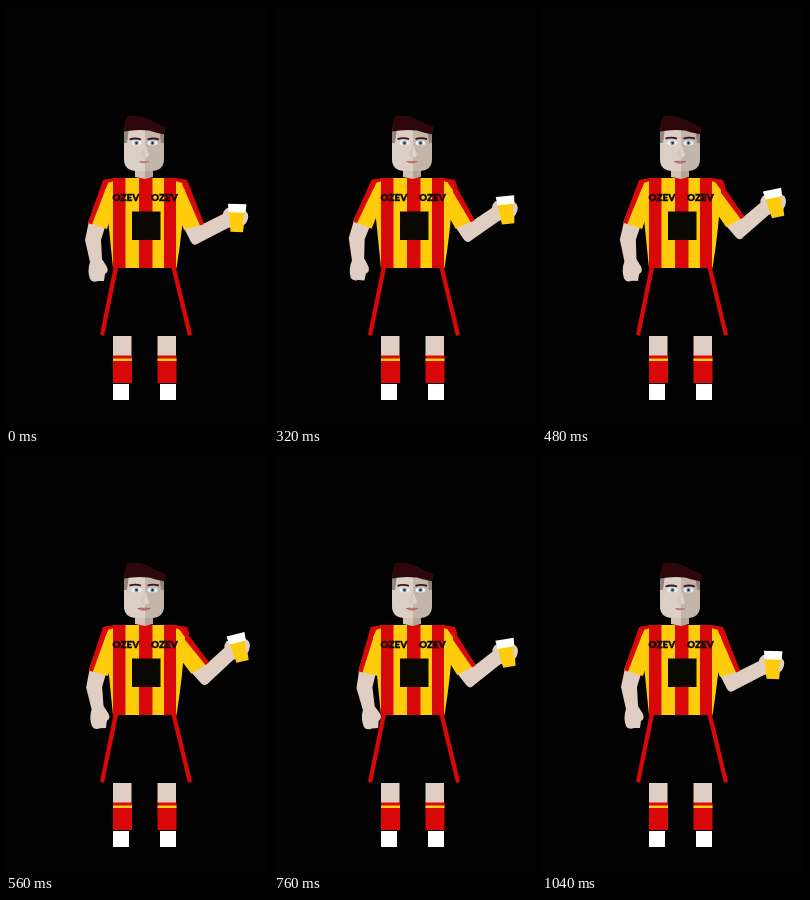
These frames come from a looping animation (262x419 px, 2.04 s). An HTML page:

```html
<!DOCTYPE html>
<html lang="nl">
<head>
<meta charset="utf-8">
<title>Supporter</title>
<style>
  html, body { margin: 0; width: 100%; height: 100%; overflow: hidden; background: #020202; }
  svg { display: block; width: 100vw; height: 100vh; }
  text { font: 900 10px Lato, "Open Sans", sans-serif; text-anchor: middle; fill: #080604; stroke: #080604; stroke-width: .3; }
  .red { fill: #d90808; }
  .yellow { fill: #ffcc0c; }
  .skin { fill: #dfcec1; }
  .hair { fill: #2e070b; }
  .brow { fill: none; stroke: #3d1416; stroke-width: 1.8; }
</style>
</head>
<body>
<svg viewBox="0 0 262 419">
  <defs>
    <clipPath id="torso"><path d="M107 172H170L179 184Q177 222 170.500 262H107Q103 222 99 184Z"/></clipPath>
    <clipPath id="face"><path d="M118 122H158V153Q158 165 145 165H131Q118 165 118 153Z"/></clipPath>
    <g id="leg">
      <path class="skin" d="M0 330H18.500V350H0Z"/>
      <path class="red" d="M0 349.500H19V377H0Z"/>
      <path class="yellow" d="M0 352.500H19V355H0Z"/>
    </g>
    <g id="eye">
      <ellipse rx="5" ry="2.500" fill="#f2efec"/>
      <circle r="2.200" fill="#6f9cc0"/>
      <circle r="1.100" fill="#14202b"/>
    </g>
  </defs>

  <g id="leftArm">
    <path class="skin" d="M83 215L79 234L84 256Q81 265 84 273Q86 277 92 275L98 275L99 268Q103 266 101 261L96 253L95 234L99 221Z"/>
    <path class="yellow" d="M98 174L82 217L101 223L112 188L108 173Z"/>
    <path class="red" d="M97 174L82 217L86 218.500L102 177Z"/>
  </g>

  <g id="rightArm">
    <path class="skin" d="M178 222L185 236Q188 241 193 237L222 222L238 219Q243 215 242 208L238 203L221 202Q217 205 217 208L197 218Z"/>
    <g transform="rotate(2 231 212)">
      <path class="yellow" d="M222.500 205H239.500L237.500 226H225Z"/>
      <path fill="#fff" d="M221.500 198H240L239.400 206.500H222.300Z"/>
    </g>
    <path class="skin" d="M238.500 206Q243 208 242 212L239 218L236.500 218Z"/>
    <path class="yellow" d="M170 176L180 176L198 218L178 224L168 198Z"/>
    <path class="red" d="M176 178L182 176L198 218L194 219.500Z"/>
  </g>

  <use href="#leg" x="107"/>
  <use href="#leg" x="151.500"/>
  <path fill="#fff" d="M107 378H123V394H107ZM154 378H170V394H154Z"/>
  <path d="M109 262H169L183 329H97Z" fill="#030202"/>
  <path class="red" d="M107.500 262H112L98 330L94 328.500ZM165.500 262H170L186 328.500L182 330Z"/>

  <g clip-path="url(#torso)">
    <path class="yellow" d="M96 172H183V263H96Z"/>
    <path class="red" d="M107 172H119.500V263H107ZM133 172H146.500V263H133ZM158 172H170V263H158Z"/>
  </g>
  <path class="red" d="M108 172L98 174L95.500 181L99.500 183L102 177L108 175ZM169 172L181 174L183.500 181L179.500 184L176 177L169 175Z"/>
  <text x="120" y="195">OZEV</text>
  <text x="158.500" y="195">OZEV</text>
  <path d="M126 205.500H154.500V234H126Z" fill="#0a0803"/>

  <path d="M129 160H139V173L129 171Z" fill="#d3c3b7"/>
  <path d="M139 160H147V171L139 173Z" fill="#b5a597"/>
  <g clip-path="url(#face)">
    <path d="M118 122H139V166H118Z" fill="#dcd0c6"/>
    <path d="M139 122H158V166H139Z" fill="#c3b5a9"/>
    <path d="M118 122H123L121 137H118ZM158 122H153L155 137H158Z" fill="#8d8580"/>
  </g>
  <path d="M139 138L134.500 149Q137 152 139 151Z" fill="#d3c6bc"/>
  <path d="M139 138L143 149Q141 152 139 151Z" fill="#e0d5cc"/>
  <use href="#eye" x="130.500" y="137"/>
  <use href="#eye" x="146.500" y="137"/>
  <g id="brows">
    <path class="brow" d="M123.500 133.500Q129 131.500 135 133.500M141.500 133.500Q147 131.500 153 133.500"/>
  </g>
  <g id="mouth">
    <path d="M-6 -.5Q-2 -2 0 -1Q2 -2 6 -.5Q0 4 -6 -.5Z" fill="#c98d87"/>
    <path d="M-6 -.5Q0 1 6 -.5" fill="none" stroke="#a64d50" stroke-width=".8"/>
  </g>
  <path class="hair" d="M118 125.500Q118.500 111 122 110Q132 108.500 141 112.500Q151 118 159.500 121L159 128.500Q150 127 143 124.500Q130 123 118 125.500Z"/>
</svg>
<script>
const LOOP = 2040, STEP = 40;
const part = id => document.getElementById(id);
const smooth = p => (1 - Math.cos(Math.PI * p)) / 2;
const softened = p => (p + smooth(p)) / 2;

// Each row is [time in ms, value].
const swing = [[40, 0], [290, 4.7], [720, -3.8], [1040, 0]];
const lift = [[80, 0], [600, 1], [1040, 0]];

function valueAt(track, time, ease) {
  if (time <= track[0][0]) return track[0][1];
  for (let i = 1; i < track.length; i++) {
    const [t0, v0] = track[i - 1], [t1, v1] = track[i];
    if (time < t1) return v0 + (v1 - v0) * ease((time - t0) / (t1 - t0));
  }
  return track[track.length - 1][1];
}

function pose(time) {
  const raised = valueAt(lift, time, softened);
  const set = (id, transform) => part(id).setAttribute('transform', transform);
  set('leftArm', `rotate(${valueAt(swing, time, smooth)} 101 180)`);
  set('rightArm', `rotate(${-16.5 * raised} 170 196)`);
  set('brows', `translate(0 ${-raised})`);
  set('mouth', `translate(138 156) scale(${0.8 + 0.25 * raised} ${0.7 + 0.5 * raised})`);
}

const start = performance.now();
function draw() {
  const time = (performance.now() - start) % LOOP;
  pose(Math.floor(time / STEP) * STEP);
  requestAnimationFrame(draw);
}
draw();
</script>
</body>
</html>
```
